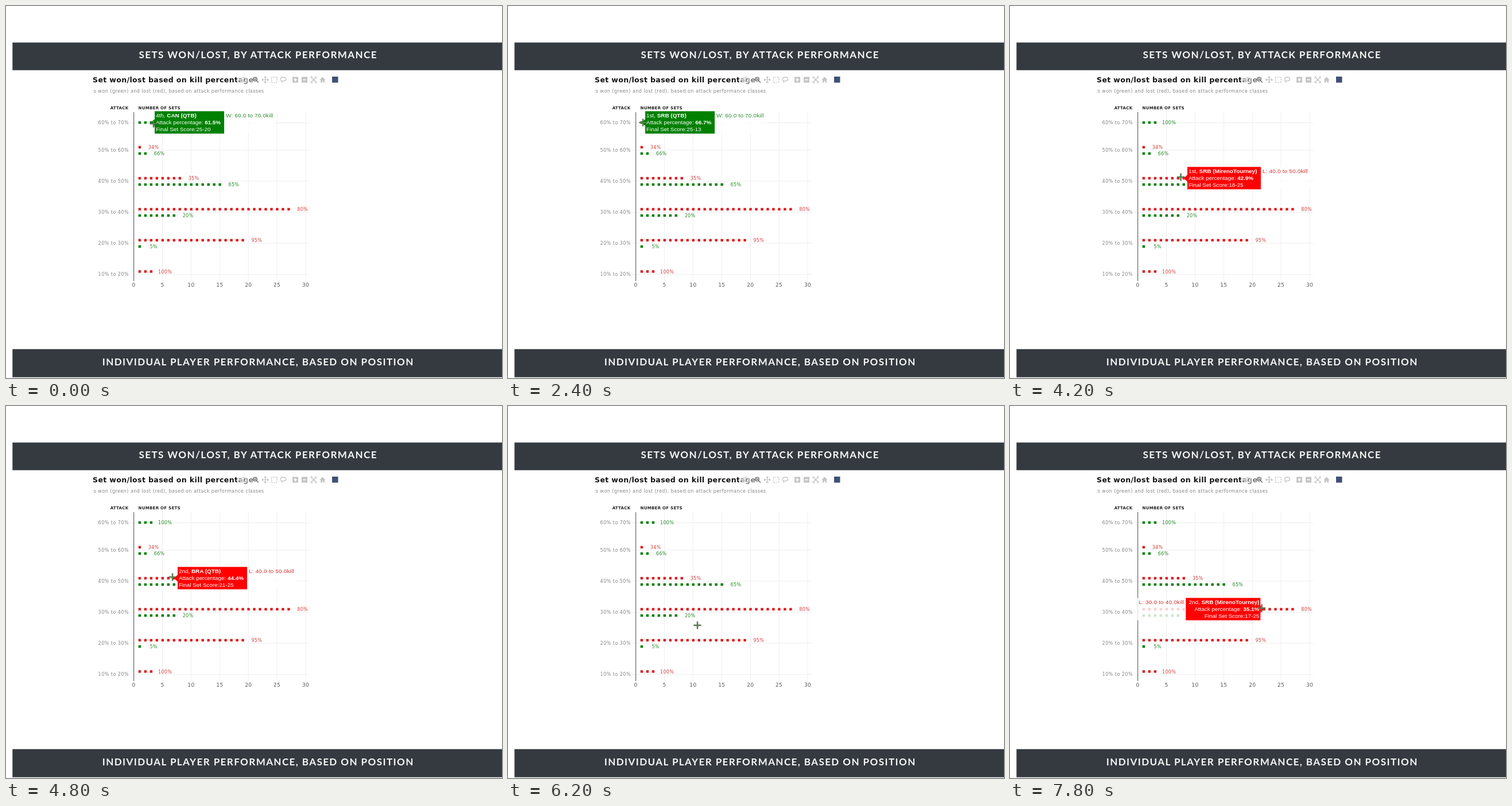
An HTML page for the animation above (8000 ms loop, 864 px wide and 648 px high).

```html
<!DOCTYPE html>
<html lang="en">
<head>
<meta charset="utf-8">
<title>Sets won/lost</title>
<style>
  html, body { margin: 0; width: 100%; height: 100%; overflow: hidden; background: #fff; }
  svg { display: block; width: 864px; height: 648px; }
  text { font-family: "DejaVu Sans", Verdana, sans-serif; }
  .bar { fill: #343a40; }
  .head { font: 700 17px Lato, sans-serif; letter-spacing: 1.43px; fill: #f8f8f8; text-anchor: middle; }
  .title { font-size: 12.5px; font-weight: 700; letter-spacing: .38px; fill: #111; }
  .small { font-size: 8px; letter-spacing: .47px; fill: #858585; }
  .caps { font-size: 7px; font-weight: 700; letter-spacing: .3px; fill: #222; }
  .tick { font-size: 9px; letter-spacing: .3px; fill: #555; text-anchor: middle; }
  .pct { font-size: 8px; letter-spacing: .3px; text-anchor: middle; }
  .end { text-anchor: end; }
  .tip text { font: 9.9px "Liberation Sans", Arial, sans-serif; }
  .tip .name { letter-spacing: .22px; }
  .bold { font-weight: 700; }
</style>
</head>
<body>
<svg viewBox="0 0 864 648">
  <defs><clipPath id="clip"><rect x="151" y="138" width="320" height="20"/></clipPath></defs>
  <rect class="bar" x="11.3" y="63.6" width="853" height="48.2"/>
  <rect class="bar" x="11.3" y="597.7" width="853" height="49"/>
  <text class="head" x="439.2" y="91">SETS WON/LOST, BY ATTACK PERFORMANCE</text>
  <text class="head" x="439.2" y="626">INDIVIDUAL PLAYER PERFORMANCE, BASED ON POSITION</text>

  <text class="title" x="151" y="133">Set won/lost based on kill percentage</text>
  <g clip-path="url(#clip)">
    <text class="small end" x="449.5" y="151">Sets won (green) and lost (red), based on attack performance classes</text>
  </g>
  <rect x="402" y="120" width="180" height="17" fill="#fff" opacity=".45"/>
  <g id="tools" fill="none" stroke="#c4c4c4" stroke-width="1.6">
    <path d="M410 125.5h9v6.5h-9zM413 124h3" stroke="#d4d4d4"/>
    <g stroke="#777"><circle cx="434" cy="127.5" r="3.2"/><path d="M436.5 130l3.5 3.5M432.5 127.5h3M434 126v3"/></g>
    <path d="M446.5 128.5h10M451.5 123.5v10M449.5 125l2-2 2 2M449.5 132l2 2 2-2M448 126.5l-2 2 2 2M455 126.5l2 2-2 2" stroke-width="1.2"/>
    <path d="M462.5 124h9.5v9.5h-9.5z" stroke-dasharray="1.6 1.6"/>
    <path d="M480 131c-3-2-2-7 3-7 6 0 6 6 1 6.5-3 .3-4-.5-4 .5s1 1.5 0 3" stroke-width="1.3"/>
    <path d="M499 123.5h10v10h-10zM515 123.5h10v10h-10z" fill="#c4c4c4" stroke="none"/>
    <path d="M504 125.5v6M501 128.5h6M517 128.5h6" stroke="#fff"/>
    <path d="M531.5 126v-2.5h2.5M538 123.5h2.5v2.5M540.5 131v2.5h-2.5M534 133.5h-2.5v-2.5M533 125.5l6 6M539 125.5l-6 6"/>
    <path d="M546.5 128.5l5-5 5 5h-1.5v5h-2.5v-3h-2v3h-2.5v-5z" fill="#c4c4c4" stroke="none"/>
    <path d="M568 123h10.5v10.5h-10.5z" fill="#3f4f75" stroke="none"/>
  </g>
  <text class="caps end" x="213.5" y="180">ATTACK</text>
  <text class="caps" x="230.5" y="180">NUMBER OF SETS</text>

  <g id="chart"></g>
  <g id="tips"></g>
  <g id="cursor" fill="none">
    <path d="M-6.5 0H6.5M0-6.5V6.5" stroke="#55584a" stroke-width="2.5"/>
    <path d="M-6 0H6M0-6V6" stroke="#5f9450" stroke-width="1.1"/>
  </g>
</svg>
<script>
const RED = '#e01818', GREEN = '#008000';
const $ = id => document.getElementById(id);
const px = n => 222.9 + 9.98 * n;

function add(parent, tag, attrs, text = '') {
  const el = document.createElementNS('http://www.w3.org/2000/svg', tag);
  for (const k in attrs) el.setAttribute(k, attrs[k]);
  el.textContent = text;
  return parent.appendChild(el);
}

// Grid and axes
const chart = $('chart');
[203.5, 251, 305, 359.5, 413, 467.5].forEach((y, i) => {
  add(chart, 'path', { d: `M216 ${y}H529`, stroke: '#eee' });
  add(chart, 'text', { class: 'small end', x: 214, y: y + 2.8 }, `${60 - 10 * i}% to ${70 - 10 * i}%`);
});
for (let n = 0; n <= 30; n += 5) {
  const x = px(n) - .3;
  add(chart, 'path', { d: `M${x} 185V479`, stroke: n ? '#eee' : '#666', 'stroke-width': n ? 1 : 1.2 });
  add(chart, 'text', { class: 'tick', x, y: 489 }, n);
}

// Rows of sets: height, count, share, colour
[
  [203, 3, 100, GREEN], [246, 1, 34, RED], [257, 2, 66, GREEN],
  [300, 8, 35, RED], [311, 15, 65, GREEN], [354, 27, 80, RED],
  [365, 7, 20, GREEN], [408, 19, 95, RED], [419, 1, 5, GREEN], [462.5, 3, 100, RED]
].forEach(([y, count, share, fill]) => {
  for (let n = 1; n <= count; n++)
    add(chart, 'rect', { x: px(n) - 2.2, y: y - 2.2, width: 4.4, height: 4.4, fill });
  add(chart, 'text', {
    class: 'pct', x: px(count) + 24.3, y: y + 3, fill: fill === RED ? '#d84040' : '#2a8a2a'
  }, share + '%');
});

// Hover labels: point, row, set, team, attack, score, width
const tips = [
  [3, 203, '4th', 'CAN (QTB)', '61.5', '25-20', 121],
  [2, 203, '3rd', 'USA (QTB)', '60.0', '25-21', 121],
  [1, 203, '1st', 'SRB (QTB)', '66.7', '25-13', 121],
  [8, 300, '1st', 'SRB (MirenoTourney)', '42.9', '18-25', 128],
  [7, 300, '2nd', 'BRA (QTB)', '44.4', '21-25', 121],
  [6, 300, '5th', 'NED (QTB)', '50.0', '12-15', 121],
  [25, 354, '1st', 'BRA (MirenoTourney)', '31.6', '16-25', 128],
  [24, 354, '3rd', 'BRA (MirenoTourney)', '32.4', '18-25', 129],
  [23, 354, '3rd', 'SRB (MirenoTourney)', '34.2', '19-25', 129],
  [22, 354, '2nd', 'SRB (MirenoTourney)', '35.1', '17-25', 130]
].map(([n, y, set, team, attack, score, w]) => {
  const g = add($('tips'), 'g', { class: 'tip' });
  const win = y === 203, fill = win ? GREEN : '#f00';
  const side = n > 20 ? -1 : 1;
  const x = px(n), near = x + side * 6.2, far = near + side * w;
  const top = y - 19.7, height = 39;
  const fade = win ? 91 : 87;
  const anchor = side < 0 ? 'end' : 'start';
  add(g, 'rect', { x: side < 0 ? far - fade : far, y: top, width: fade, height, fill: '#fff', opacity: .8 });
  add(g, 'rect', { x: Math.min(near, far), y: top, width: w, height, fill });
  add(g, 'path', { d: `M${x} ${y}L${near} ${y - 6}V${y + 6}z`, fill });
  [[set + ', ', team], ['Attack percentage: ', attack + '%'], ['Final Set Score:' + score, '']].forEach(([a, b], i) => {
    const line = add(g, 'text', { x: near + side * 2, y: y - 9 + 12 * i, fill: '#fff', 'text-anchor': anchor }, a);
    add(line, 'tspan', { class: 'bold' }, b);
  });
  add(g, 'text', {
    class: 'name', x: far + side * 3, y: y - 9, fill: win ? '#2a8a2a' : '#d83030', 'text-anchor': anchor
  }, win ? 'W: 60.0 to 70.0kill' : y === 300 ? 'L: 40.0 to 50.0kill' : 'L: 30.0 to 40.0kill');
  return g;
});

// Pointer steps: time / 200 ms, x, y, hover label (-1 for none)
const steps = [
  [0, 257, 205, 0], [2, 255, 205, 0], [3, 252, 204, 0], [4, 248, 204, 1], [6, 246, 204, 1],
  [8, 243, 204, 1], [9, 238, 203, 2], [10, 235, 203, 2],
  [13, 244, 221, -1], [14, 276, 262, -1], [15, 300, 288, -1], [16, 298, 295, 3], [17, 297.5, 298, 3],
  [22, 295, 298, 4], [24, 290, 298, 4], [25, 286, 298, 5], [26, 283, 298, 5],
  [30, 291, 322, -1], [31, 330, 382, -1], [32, 390, 385, -1], [33, 446, 378, -1], [34, 470, 350, 6],
  [36, 467, 351, 6], [37, 460, 352, 7], [38, 449, 352, 8], [39, 438.5, 352, 9]
];

function draw(now) {
  const tick = now % 8000 / 200;
  const [, x, y, tip] = steps.findLast(s => s[0] <= tick);
  $('cursor').setAttribute('transform', `translate(${x} ${y})`);
  tips.forEach((g, i) => g.style.display = i === tip ? '' : 'none');
}

function loop() {
  draw(performance.now());
  requestAnimationFrame(loop);
}
loop();
</script>
</body>
</html>
```
